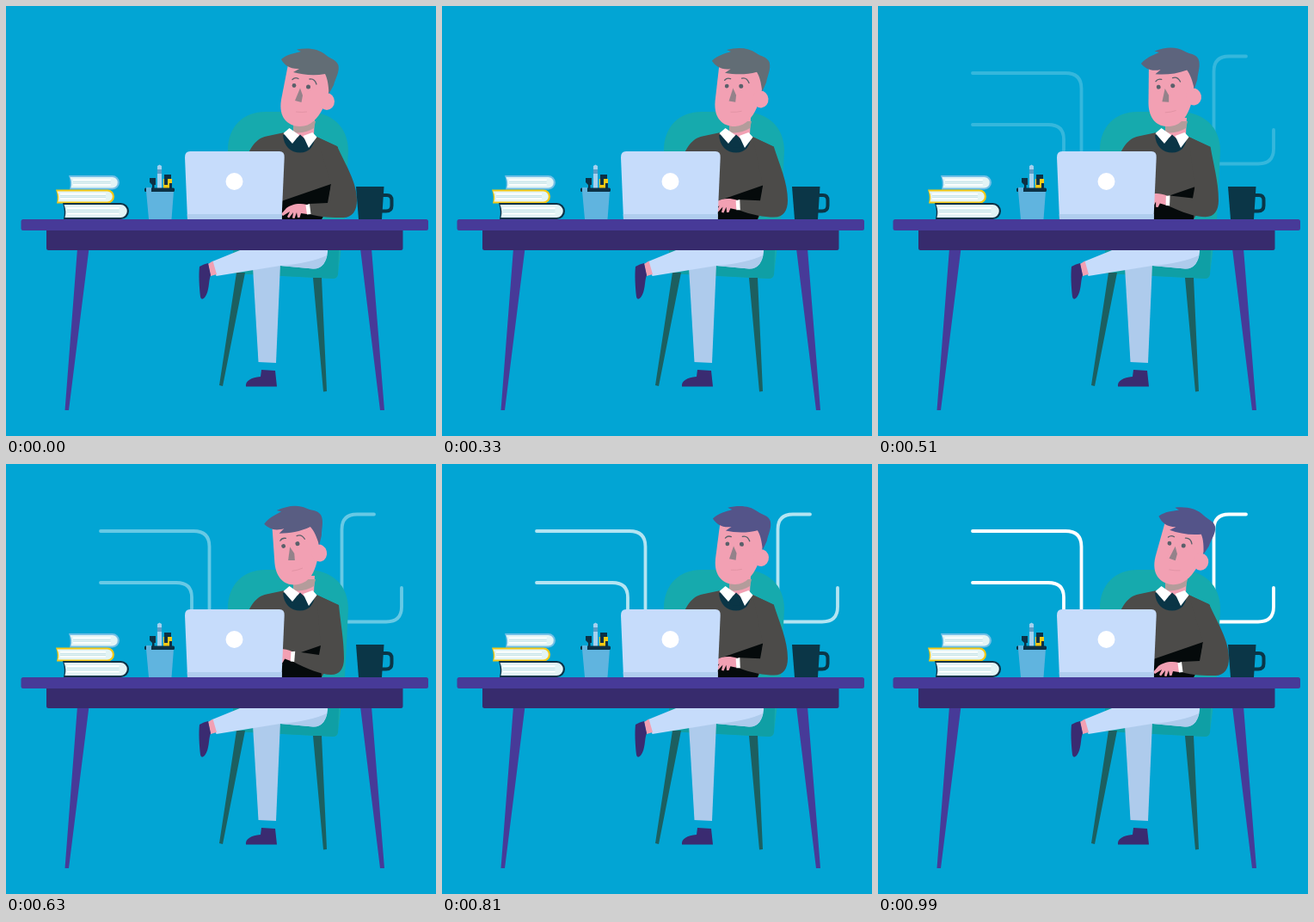
An HTML page that plays this animation: 500x500 px, repeating every 2310 ms.

```html
<!DOCTYPE html>
<html lang="en">
<head>
<meta charset="utf-8">
<title>Man at a desk</title>
<style>
  html, body { margin: 0; width: 100%; height: 100%; overflow: hidden; background: #02a5d4; }
  svg { display: block; width: 100vw; height: 100vh; }
</style>
</head>
<body>
<svg viewBox="0 0 500 500">
  <rect width="500" height="500" fill="#02a5d4"/>

  <g id="lines" fill="none" stroke="#fff" stroke-width="3.8" stroke-linecap="round">
    <path d="M110 78H218Q236.500 78 236.500 96V175"/>
    <path d="M110 138H198Q216 138 216 155V175"/>
    <path d="M428 58.500H408Q390.500 58.500 390.500 76V150"/>
    <path d="M460 144V166Q460 183.500 442 183.500H390"/>
  </g>

  <g id="chair">
    <path fill="#16aaad" d="M258 200V168C258 140 276 123 302 123H350C380 123 398 142 398 168L394 248 386 311Q386 317 380 317L264 311 270 250Z"/>
    <path fill="#0f9fa5" d="M264 284H387L386 312Q385 317 380 317L264 311Z"/>
    <path fill="#1c5f60" d="M268 310H278L252 442 248 441ZM357 316H367L373 448 369 448.500Z"/>
  </g>

  <g id="legs">
    <path fill="#aecbec" d="M287 304 319 300 314 415 293.500 414Z"/>
    <path fill="#c6dcfb" d="M240 297 272 284V270H374V286C373 298 367 306 357 305.500L319 302 288 307 244.500 314Z"/>
    <path fill="#aecbec" d="M319 302C342 300 360 296 373 290C371 300 366 306 357 305.500Z"/>
    <path fill="#f2a0b3" d="M235 300 240.500 296.500 245 312 238 314Z"/>
    <path fill="#3a2b71" d="M225 303Q230 300 235 299L238 313C235 321 237 331 231 339Q227 343 226 338C224.500 325 224 312 225 303ZM297 423 313 424 315 442.500H279C278 436 285 432 296 431Z"/>
  </g>

  <g id="man">
    <path fill="#4c4b49" d="M278 180C286 160 293 153 305 151L324 147 361 152 386 164 380 225 367 248H290Z"/>
    <path id="shade" fill="#050a0b"/>
    <path id="arm" fill="#4c4b49"/>
    <g id="hand">
      <path fill="#f2a0b3" d="M350 231C340 228.500 331 231 326 235L320 242 322 244 330 239 327 245 329 246.500 334 240 333 246.500 335.500 247 338 240 339 246 341.500 246 343 241 350 242Z"/>
      <path fill="#fff" d="M348.500 231.500 353 230 354.500 242 350 242.500Z"/>
    </g>
    <path fill="#0a3546" d="M322 150C323 163 331 170.500 342 170.500C352 170.500 358 164 359 153L344 148Z"/>
    <path fill="#f2a0b3" d="M334 130H359L358 149 343 157 334 148Z"/>
    <path fill="#b39c9b" d="M334 134H360L358 142Q347 149 334 147Z"/>
    <path fill="#0a3546" d="M338 154 342 149.500 348 155 346 165 338 164Z"/>
    <path fill="#fff" d="M322.500 148 329.500 142 341 150 333 160ZM361.500 152.500 356.500 147 345.500 151 352 165Z"/>
    <g id="head">
      <path fill="#f2a0b3" d="M328 68 320 109C316.500 130 328 139.500 341 140C354 140.500 362 131 368 120L376 98 374 72Z"/>
      <ellipse cx="373" cy="111" rx="9" ry="10" fill="#f2a0b3"/>
      <path id="hair" d="M320 62C327 56 335 55 343 53L338 50.500C352 48 364 50 372 57C378 62 384 62 386.500 69C388 77 383 84 381 92L375.500 102C375 92 374 85 371 79C358 81.500 345 80 334 77L341 73C330 73.500 324 69 320 62Z"/>
      <g fill="#59606a">
        <circle cx="335" cy="92.500" r="2.400"/>
        <circle cx="351.500" cy="94" r="2.500"/>
      </g>
      <path fill="none" stroke="#59606a" stroke-width="1.300" stroke-linecap="round" d="M333 85.500Q336 82.500 340 84.500M353 85Q359 84 361 91"/>
      <path fill="#94828a" d="M342 95.500 345 104 343.500 112 336 110Z"/>
      <path fill="none" stroke="#df91a2" stroke-width=".8" d="M337 123Q344 124 350 123"/>
    </g>
  </g>

  <g id="laptop">
    <path fill="#c6dcfb" d="M214 169H318Q324 169 323.700 176L320.500 248H211L208 176Q208 169 214 169Z"/>
    <path fill="#b0cdee" d="M210.700 242H320.800V248H211Z"/>
    <circle cx="265.500" cy="204" r="10" fill="#fff"/>
  </g>

  <g id="books"></g>

  <g id="pens">
    <path fill="#a3d1ef" d="M176 212V186L178.500 184.500 181 186V212Z"/>
    <path fill="#5b9dc8" d="M176 190H181V195H176Z"/>
    <path fill="#0c3145" d="M167 200H174V208H172.500V213H170V208L167 205Z"/>
    <path fill="#f6c915" d="M183 201H193V213H183Z"/>
    <path fill="#0c3145" d="M184 196H192V201H188V208H184ZM190 206H193V213H190Z"/>
    <path fill="#60b4df" d="M163 215H195L192.500 248H166Z"/>
    <rect x="161" y="211.500" width="35" height="4.500" rx="1.500" fill="#0c3145"/>
    <path fill="#60b4df" d="M163 211H169V216H163Z"/>
  </g>

  <g id="mug">
    <path fill="#0b3647" d="M407 210H439.500L437 248H410Z"/>
    <path fill="none" stroke="#0b3647" stroke-width="4" d="M437 220H443Q448.500 220 448.500 226V232Q448.500 238.500 442 238.500H436"/>
  </g>

  <g id="desk">
    <path fill="#473a98" d="M83 282H96.500L73 470H68.500ZM412 282H425L440 470H435Z"/>
    <rect x="47" y="255" width="414.500" height="29" rx="2.500" fill="#372b6d"/>
    <rect x="17.500" y="248" width="473.500" height="13" rx="2.500" fill="#473a98"/>
  </g>
</svg>
<script>
const LOOP = 2310, STEP = 30, MOVE_START = 180, MOVE_END = 990;
const el = id => document.getElementById(id);
const lerp = (a, b, k) => a + (b - a) * k;
const clamp = v => Math.min(1, Math.max(0, v));

// Linear track through [time, value] pairs, held at both ends.
function track(keys, t) {
  if (t <= keys[0][0]) return keys[0][1];
  for (let i = 1; i < keys.length; i++) {
    const [t0, v0] = keys[i - 1], [t1, v1] = keys[i];
    if (t <= t1) return lerp(v0, v1, (t - t0) / (t1 - t0));
  }
  return keys[keys.length - 1][1];
}

// Blends two paths that share the same commands.
function blend(from, to, k) {
  const ends = to.match(/[\d.]+/g);
  let i = 0;
  return from.replace(/[\d.]+/g, n => lerp(+n, +ends[i++], k).toFixed(2));
}

function book(x, y, right, h, cover) {
  const shape = (l, top, r, height) => {
    const c = height / 2;
    return `M${l} ${top}H${r - c}a${c} ${c} 0 0 1 0 ${height}H${l + 1}q2 ${-c} -1 ${-height}Z`;
  };
  const line = dy => `M${x + 5} ${y + h * dy}H${right - h / 2 - 2}`;
  return `<path fill="${cover}" d="${shape(x, y, right, h)}"/>
    <path fill="#e3f4f5" d="${shape(x + 1.5, y + 2, right - 2.2, h - 4)}"/>
    <path stroke="#fff" stroke-width="1.6" d="${line(.32)}${line(.66)}"/>
    <path stroke="#c5e3e8" stroke-width=".8" d="${line(.44)}${line(.56)}"/>`;
}

el('books').innerHTML =
  book(73, 197, 132, 16.5, '#72bfe6') +
  book(58, 213.5, 126, 16, '#f6c915') +
  book(66, 229, 143, 19, '#0c3247');

const ARM_OUT = 'M361 152L385 163C395 185 408 205 408 226C408 238 403 246 392 246C380 246 366 246 353 242L353 230L374 229L378 207Z';
const ARM_IN = 'M361 152L387 164C389 185 393 205 393 226C393 238 388 245 378 245C366 245 350 238 334 230L336 218L364 222L366 211Z';
const SHADE_OUT = 'M320 227L378 207L374 235L367 248L320 248Z';
const SHADE_IN = 'M320 227L366 211L366 235L367 248L320 248Z';

const ARM_KEYS = [[180, 0], [330, .4], [510, .8], [630, 1], [810, .4], [990, 0]];
const HEAD_KEYS = [[180, 0], [330, -4.5], [510, -10.5], [630, -15], [810, -3.7], [990, 4.6]];
const HAIR_GREY = [98, 109, 117], HAIR_VIOLET = [84, 84, 137];

function draw(t) {
  const reach = track(ARM_KEYS, t);
  el('arm').setAttribute('d', blend(ARM_OUT, ARM_IN, reach));
  el('shade').setAttribute('d', blend(SHADE_OUT, SHADE_IN, reach));
  el('hand').setAttribute('transform',
    `translate(${-18 * reach} ${-12.5 * reach}) rotate(${12 * reach} 352 236)`);
  el('head').setAttribute('transform', `rotate(${track(HEAD_KEYS, t)} 340 141)`);
  const tint = clamp((t - 330) / 480);
  el('hair').setAttribute('fill',
    `rgb(${HAIR_GREY.map((c, i) => Math.round(lerp(c, HAIR_VIOLET[i], tint)))})`);
  el('lines').setAttribute('opacity', clamp((t - 390) / 600));
}

let start;
function tick(now) {
  start ??= now;
  const t = Math.floor(((now - start) % LOOP) / STEP) * STEP;
  draw(Math.min(MOVE_END, Math.max(MOVE_START, t)));
  requestAnimationFrame(tick);
}
draw(MOVE_START);
requestAnimationFrame(tick);
</script>
</body>
</html>
```
